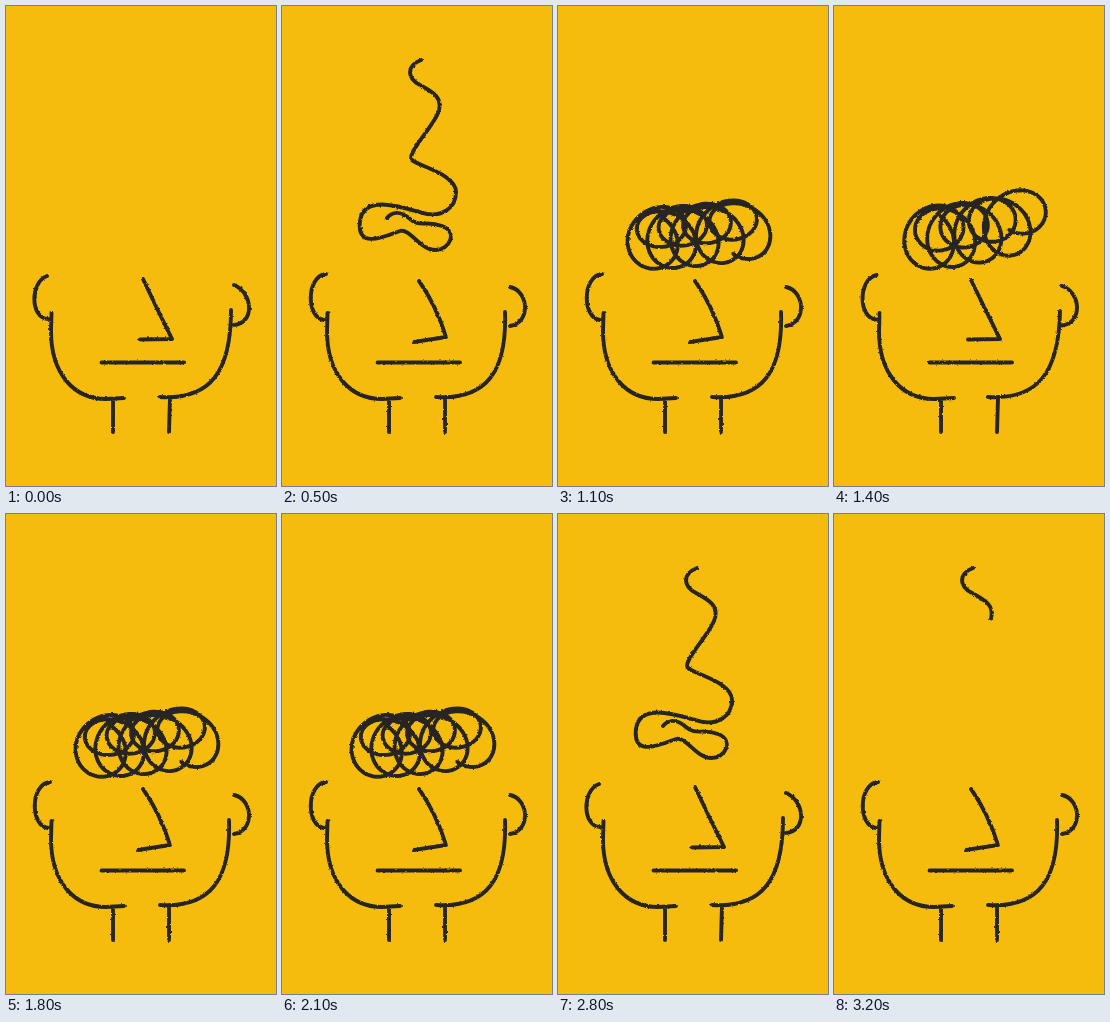
Write an HTML page that moves like this. It is 270 px wide and 480 px high and loops after 3300 ms.

```html
<!DOCTYPE html>
<html lang="en">
<head>
<meta charset="utf-8">
<title>Tangled head</title>
<style>
html, body { margin: 0; width: 100%; height: 100%; overflow: hidden; background: #f5bb0d; }
svg { display: block; width: 270px; height: 480px; }
</style>
</head>
<body>
<svg viewBox="0 0 270 480">
  <filter id="crayon" filterUnits="userSpaceOnUse" x="0" y="0" width="270" height="480"
      color-interpolation-filters="sRGB">
    <feTurbulence id="grain" type="fractalNoise" baseFrequency=".4" numOctaves="2"/>
    <feDisplacementMap in="SourceGraphic" scale="2.4" xChannelSelector="R" yChannelSelector="G"/>
  </filter>
  <g filter="url(#crayon)" fill="none" stroke="#262523" stroke-width="3.9"
      stroke-linecap="round" stroke-linejoin="round">
    <path id="face"/>
    <path id="thread" pathLength="1" d="M139 54C124 60 125 72 138 79S162 92 156 107S124 148 130 154
      S174 168 174 186S158 210 145 208S82 184 78 215S108 228 118 225S138 244 153 244
      S176 226 160 220S138 222 128 213S110 206 105 212"/>
    <path id="tangle" pathLength="1"/>
  </g>
</svg>
<script>
const STEP = 100, COUNT = 33;
const { sin, cos, PI } = Math;
const $ = id => document.getElementById(id);
const clamp = v => Math.max(0, Math.min(1, v));

// The same head drawn three times by hand; the last one has a bent nose.
function face(pose) {
  const bend = pose === 2 ? 1 : 0;
  return `M${41 + 1.5 * pose} ${270 - pose}C24 ${276 - 3 * pose} 24 312 42 ${313 + pose / 2}
    M45.5 307L45 325C45 368 68 393 100 393L${118 + pose % 2 * 2} 392
    M107 394V426M${164 - bend} 392L163 426
    M154 391C205 394 225 365 ${225 + pose % 2 - 2 * bend} ${304 + pose}
    M228 ${279 + pose}C247 ${287 - pose} 249 317 228 ${319 + pose / 2}
    M137 ${273 + pose}Q${151 + 3 * bend} ${303 - 4 * bend} ${166 - 2 * bend} ${333 - 2 * bend}
    L${134 - 2 * bend} ${333.5 + 2.5 * bend}
    M95.5 356.5H178`;
}

// Figure eights of slowly changing size and lean.
function eights(u) {
  const a = u * 12 * PI + 2.6;
  return [
    136 + 4 * sin(a * .6) + (58 + 15 * sin(a * .37)) * sin(a),
    221 + 5 * cos(a * .45) + (30 + 5 * cos(a * .3)) * sin(2 * a + .5 * sin(a * .7))
  ];
}

// A coil of rings that rolls from left to right, bobbing up and down.
const coil = (turns, width, height, rise, bob) => u => {
  const a = u * turns * 2 * PI - 1;
  return [
    92 + 98 * u ** 1.2 + width * cos(a),
    228 - rise * u * u + bob * sin(a / 2 + 1) + height * sin(a)
  ];
};

function trace(curve, n = 400) {
  return 'M' + Array.from({ length: n + 1 }, (_, i) =>
    curve(i / n).map(v => v.toFixed(1)).join(' ')).join('L');
}

const tangles = [eights, coil(7.5, 27, 26, 18, 9), coil(8.5, 27, 24, 10, 11)].map(c => trace(c));

function show(path, from, to) {
  path.style.display = to > from ? '' : 'none';
  path.setAttribute('stroke-dasharray', `${to - from} 2`);
  path.setAttribute('stroke-dashoffset', -from);
}

function render(step) {
  const pose = (step + (step > 12 && step < 30 ? 2 : 0)) % 3;
  // The thread leaves the same way it came in.
  const k = Math.min(step, COUNT - step);
  $('grain').setAttribute('seed', pose + 1);
  $('face').setAttribute('d', face(pose));
  $('tangle').setAttribute('d', tangles[pose]);
  show($('thread'), clamp((k - 7) / 2), clamp((k / 5) ** 1.22));
  show($('tangle'), 0, clamp((k - 5) / 3));
}

let shown = -1;
const start = performance.now();
function tick() {
  const step = Math.floor((performance.now() - start) / STEP) % COUNT;
  if (step !== shown) render(shown = step);
  requestAnimationFrame(tick);
}
tick();
</script>
</body>
</html>
```
